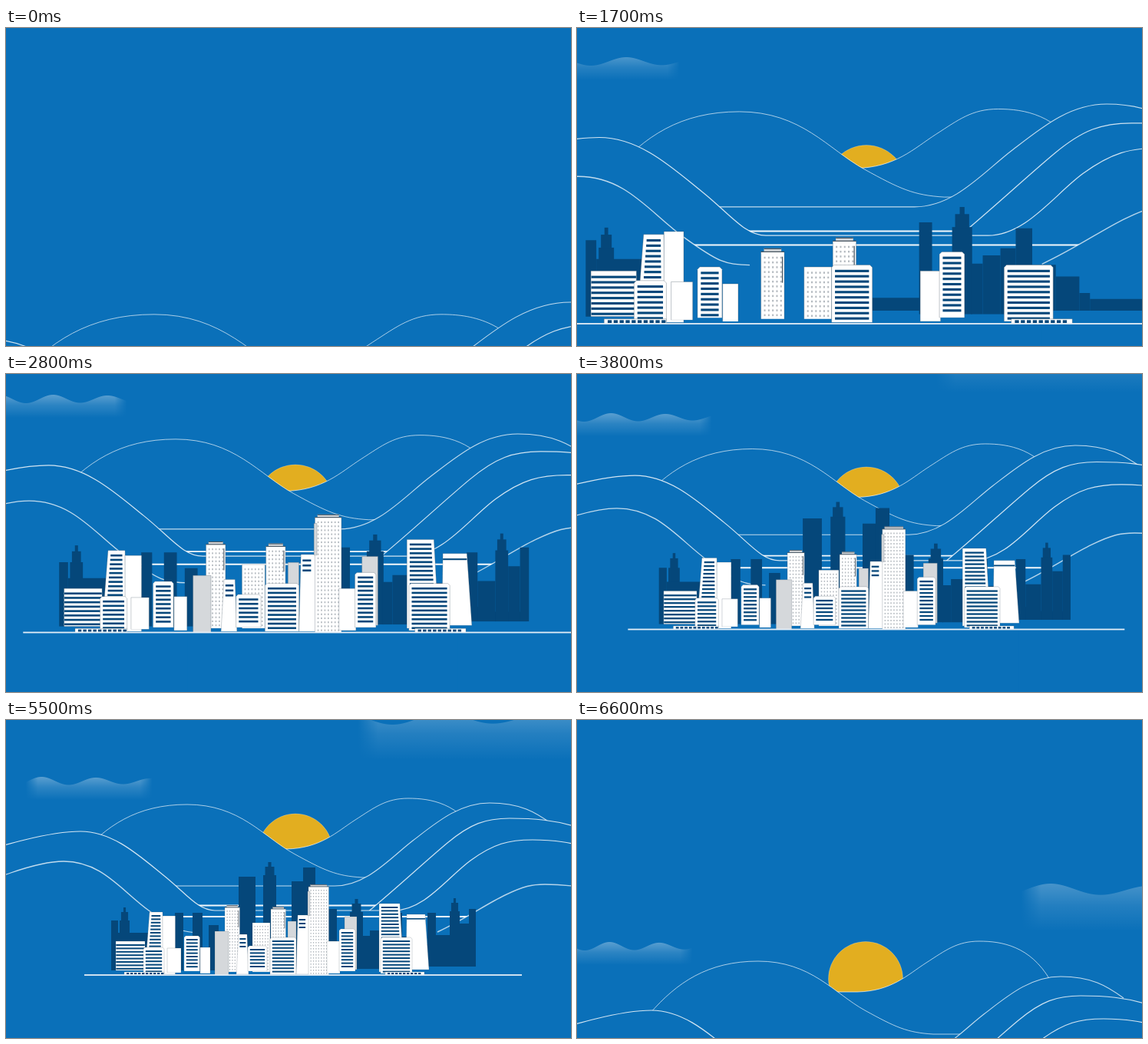
Write an HTML page with a canvas that moves like this. It is 736 by 414 pixels and loops after 6700 ms.

```html
<!DOCTYPE html>
<html lang="en">
<head>
<meta charset="utf-8">
<title>Skyline</title>
<style>
  html, body { margin: 0; width: 100%; height: 100%; overflow: hidden; background: #0a70b9; }
  canvas { display: block; }
</style>
</head>
<body>
<canvas id="stage" width="736" height="414"></canvas>
<script>
const W = 736, H = 414, LOOP = 6700, STEP = 100;
const SKY = '#0a70b9', NAVY = '#05477a', GREY = '#d5d8db', INK = '#46535f', SUN = '#e2ae20';
const c = document.getElementById('stage').getContext('2d');

// Smooth monotone interpolation through values at the shared key times (seconds).
const KEYS = [0, .8, 1.7, 2.15, 2.8, 3.8, 5.5];
function track(v, t) {
  const n = KEYS.length - 1;
  if (t >= KEYS[n]) return v[n];
  let i = 0;
  while (t >= KEYS[i + 1]) i++;
  const sec = j => (v[j + 1] - v[j]) / (KEYS[j + 1] - KEYS[j]);
  const slope = j => {
    if (j === 0) return sec(0);
    if (j === n) return sec(n - 1);
    const a = sec(j - 1), b = sec(j);
    return a * b <= 0 ? 0 : 2 * a * b / (a + b);
  };
  const h = KEYS[i + 1] - KEYS[i], u = (t - KEYS[i]) / h, w = 1 - u;
  return v[i] * (1 + 2 * u) * w * w + slope(i) * h * u * w * w
       + v[i + 1] * u * u * (3 - 2 * u) - slope(i + 1) * h * u * u * w;
}

const MOVE = {
  zoom: [1.42, 1.328, 1.24, 1.195, 1.147, 1.076, 1],
  hill: [357, 217, 99, 71, 78, 93, 108],
  sun: [424, 280, 152.5, 118, 118, 121, 122],
  city: [2.05, 1.82, 1.56, 1.43, 1.302, 1.135, 1],
  ground: [700, 542, 385, 350, 336.5, 332.5, 332],
  cloudY: [300, 171, 38, 13, 27, 51, 74],
  cloudPeak: [68, 66, 64, 63, 61, 44, 46],
  cloudPeriod: [93, 93, 93, 82, 71, 71, 71],
  cloudLeft: [-30, -30, -30, -30, -25, -18, 25],
  cloudRight: [90, 105, 133, 145, 157, 175, 190],
  cloudAlpha: [0, .1, .8, .9, 1, 1, 1],
  farY: [-90, -90, -90, -90, -75, -38, -10],
  farLeft: [480, 480, 480, 480, 475, 467, 458],
  farPeak: [600, 600, 600, 600, 595, 583, 569]
};

function ridge(d, anchor, lift, drop, line, alpha, far) {
  const start = d.match(/-?\d+/)[0];
  return { edge: new Path2D(d), body: new Path2D(`${d}V900H${start}Z`), anchor, lift, drop, line, alpha, far };
}
// Back to front: path, top, extra offset per zoom, final fall, line width, opacity
const RIDGES = [
  ridge('M330 168H365C410 167 430 146 455 130S495 102 524 102S590 108 616 152', 102, 52, 186, 1, .65, true),
  ridge('M95 178C130 138 170 110 236 110C305 110 335 152 375 174S430 203 464 205H500', 110, 33, 204, 1, .65, true),
  ridge('M150 216H428C470 216 500 180 530 157S590 108 630 108S690 120 712 136', 108, 0, 226, 1.1, .75),
  ridge('M235 241.5H500', 241.5, 0, 232, 1.9, .95),
  ridge('M470 251C510 218 545 185 575 160S625 128 656 128S715 130 745 140', 128, 0, 231, 1.2, .8),
  ridge('M-80 186C-20 168 50 145 97 145C140 145 175 178 205 202S250 248 272 248H505C545 248 575 205 605 183S655 156 686 156S735 160 760 166', 145, -10, 233, 1.2, .82),
  ridge('M170 256H622', 256, 0, 238, 1.9, .95),
  ridge('M-80 236C-20 206 40 184 75 184C125 184 150 222 186 248S230 277 255 277', 184, 0, 240, 1.3, .75),
  ridge('M562 276C600 258 625 240 650 228S685 214 702 214S745 216 775 222', 214, 0, 240, 1.4, .7)
];

function drawRidge(r, t, fall) {
  const z = track(MOVE.zoom, t) - 1, s = 1 + z * (r.far ? .71 : 1);
  const rest = r.far ? r.anchor - 108 : (r.anchor - 108) * s;
  c.save();
  c.translate(380, track(MOVE.hill, t) + rest + r.lift * z + r.drop * fall);
  c.scale(s, s);
  c.translate(-380, -r.anchor);
  c.fillStyle = SKY;
  c.fill(r.body);
  c.lineWidth = r.line / s;
  c.strokeStyle = `rgba(255,255,255,${r.alpha})`;
  c.stroke(r.edge);
  c.restore();
}

// x, width, top, base, kind, start of rise, inset of top left, inset of top right
const BACK = [
  [303, 22, 204, 324, 'dark', 3], [335, 17, 185, 324, 'spire', 3.05],
  [372, 17, 210, 324, 'dark', 3.1], [387, 16, 192, 324, 'dark', 3],
  [137, 9, 261, 326, 'dark', 1.1], [148, 13, 244, 326, 'spire', 1.3], [146, 44, 277, 326, 'dark', 1.1],
  [220, 11, 251, 326, 'dark', 1.8], [243, 13, 251, 326, 'dark', 1.8], [264, 13, 267, 326, 'dark', 1.75],
  [380, 60, 310, 321, 'dark', 1], [420, 11, 246, 324, 'dark', 1], [448, 17, 233, 324, 'spire', 1],
  [431, 17, 290, 324, 'dark', 1], [464, 10, 281, 324, 'dark', 1], [474, 15, 274, 324, 'dark', 1],
  [489, 13, 268, 324, 'dark', 1], [502, 14, 251, 324, 'dark', 1], [516, 20, 282, 321, 'dark', 1],
  [536, 20, 292, 321, 'dark', 1], [556, 9, 306, 321, 'dark', 1], [565, 45, 311, 321, 'dark', 1],
  [549, 11, 251, 321, 'dark', 1.8], [560, 18, 280, 321, 'dark', 1.8], [578, 13, 232, 321, 'spire', 1.8],
  [591, 12, 265, 321, 'dark', 1.8], [603, 9, 246, 321, 'dark', 1.85]
];
const FRONT = [
  [143, 38, 288, 326, 'lines', 1],
  [181, 24, 250, 328, 'stripe', 1.32, 6, 1], [204, 16.5, 255, 331, 'white', 0],
  [179, 27, 296, 330, 'stripe', 1], [154, 52, 328, 332, 'base', 1],
  [210, 18, 297, 329, 'white', 1], [232, 20.5, 281, 327, 'stripe', 1.3], [253, 13, 296, 330, 'white', 1.3],
  [285, 19.5, 241, 328, 'tower', 1.48], [321, 23, 264, 328, 'dots', 1.48], [345, 19.5, 243, 328, 'tower', 1.41],
  [367, 11, 262, 328, 'grey', 1.75], [272, 18, 275, 332, 'grey', 1.75],
  [300, 16, 279, 331, 'marks', 1.8, 3, 2], [315, 25, 294, 327, 'stripe', 1.75],
  [344, 34, 283, 331, 'stripe', 1], [378, 17, 254, 331, 'marks', 1.8, 2],
  [441, 16, 256, 325, 'grey', 1.75], [394, 26.5, 214, 332, 'tower', 1.75], [393, 3, 223, 255, 'grey', 1.9],
  [418, 17, 288, 330, 'white', 1], [434, 21, 272, 327, 'stripe', 1],
  [486, 32, 239, 328, 'stripe', 1.8, 0, 5], [521, 30, 253, 325, 'slab', 1.8, 1, 5],
  [488, 41, 283, 330, 'stripe', 1], [494, 51, 328, 332, 'base', 1]
];

function box(x, y, w, h, color) {
  c.fillStyle = color;
  c.fillRect(x, y, w, h);
}

function drawBuilding([x, w, top, base, kind, start, insetL = 0, insetR = 0], t) {
  const u = Math.min(1, (t - start) / .7);
  if (u <= 0) return;
  const h = base - top, r = x + w;
  const dark = kind === 'dark' || kind === 'spire';
  c.save();
  c.beginPath();
  c.rect(x - 1, 0, w + 2, base);
  c.clip();
  c.translate(0, h * (start ? (1 - u) ** 3 : 0));
  if (kind === 'spire') {
    box(x, top + 17, w, h - 17, NAVY);
    box(x + w * .15, top + 6, w * .7, 12, NAVY);
    box(x + w * .38, top, w * .24, 7, NAVY);
    c.restore();
    return;
  }
  const roof = kind === 'tower' ? top + 3 : top;
  const bevel = kind === 'stripe' && !insetL && !insetR ? 2 : 0;
  c.beginPath();
  c.moveTo(x, base);
  c.lineTo(x + insetL, roof + bevel);
  c.lineTo(x + insetL + bevel, roof);
  c.lineTo(r - insetR - bevel, roof);
  c.lineTo(r - insetR, roof + bevel);
  c.lineTo(r, base);
  c.closePath();
  c.fillStyle = dark ? NAVY : kind === 'grey' ? GREY : '#fff';
  c.fill();
  if (!dark) {
    c.lineWidth = .4;
    c.strokeStyle = 'rgba(70,85,100,.55)';
    c.stroke();
  }
  if (kind === 'stripe' || kind === 'lines') {
    const pad = kind === 'lines' ? .3 : 2.8;
    for (let y = top + 4; y < base - 3; y += 4.4) {
      const k = 1 - (y - top) / h, left = x + pad + insetL * k;
      box(left, y, r - pad - insetR * k - left, 2, NAVY);
    }
  }
  if (kind === 'tower' || kind === 'dots') {
    for (let y = roof + 4; y < base - 2; y += 4)
      for (let px = x + 2.5; px < r - 2; px += 3.4) box(px, y, 1.3, 1.6, '#b3b9bf');
  }
  if (kind === 'tower') {
    box(x + 2.5, top, w - 5, 3, GREY);
    box(x + 2.5, top, w - 5, .8, INK);
    box(x, roof - .5, w, .8, INK);
    if (w < 24) box(r - 2, roof + 4, .8, h * .25, INK);
  }
  if (kind === 'marks') for (let i = 0; i < 3; i++) box(x + 2 + insetL * .8, top + 5 + i * 5, w * .5, 2, NAVY);
  if (kind === 'slab') box(x + 1, top + 5, w - 6, 1.6, NAVY);
  if (kind === 'base') for (let px = x + 3; px < r - 3; px += 5) box(px, top + 1, 3.4, 2.4, NAVY);
  c.restore();
}

function drawCity(t, fall) {
  const layer = (pivot, s, paint) => {
    c.save();
    c.translate(pivot, track(MOVE.ground, t) + 290 * fall);
    c.scale(s, s);
    c.translate(-pivot, -332);
    paint();
    c.restore();
  };
  const s = track(MOVE.city, t);
  layer(372, 1 + (s - 1) * .955, () => BACK.forEach(b => drawBuilding(b, t)));
  layer(366, s, () => {
    FRONT.forEach(b => drawBuilding(b, t));
    box(102, 332 - .9 / s, 570, 1.8 / s, '#e4eef7');
  });
}

// A wavy top edge with a fade downwards and at both ends
function drawCloud(peak, period, amp, top, left, right, depth, alpha, soft) {
  const g = c.createLinearGradient(0, top, 0, top + depth);
  g.addColorStop(0, 'rgba(255,255,255,.33)');
  g.addColorStop(.45, 'rgba(255,255,255,.14)');
  g.addColorStop(1, 'rgba(255,255,255,0)');
  c.fillStyle = g;
  for (let x = Math.max(0, Math.round(left)); x < Math.min(W, right); x++) {
    const d = x - peak, a = amp * (1 - Math.min(.5, Math.max(0, d) * .0025));
    const y = top + amp - a * Math.cos(2 * Math.PI * d / period);
    c.globalAlpha = alpha * Math.min(1, (x - left) / soft, (right - x) / soft);
    c.fillRect(x, y, 1, top + depth - y);
  }
  c.globalAlpha = 1;
}

function drawSun(t, fall) {
  const r = 48.5 + 12 * (track(MOVE.zoom, t) - 1);
  c.beginPath();
  c.arc(377 - fall, track(MOVE.sun, t) + r + 166.5 * fall, r, 0, 7);
  c.fillStyle = SUN;
  c.fill();
  c.lineWidth = .8;
  c.strokeStyle = 'rgba(255,255,255,.3)';
  c.stroke();
}

function draw(t) {
  const fall = Math.max(0, t - 5.6) ** 3.3;
  const at = name => track(MOVE[name], t);
  box(0, 0, W, H, SKY);
  drawCloud(at('cloudPeak') - 4 * fall, at('cloudPeriod') - 6 * fall, 5.5, at('cloudY') + 215 * fall,
    at('cloudLeft') - 45 * fall, at('cloudRight') - 40 * fall, 30, at('cloudAlpha'), 16);
  drawCloud(at('farPeak') + 48 * fall, 132, 8, at('farY') + 223 * fall,
    at('farLeft') + 120 * fall, W + 60, 62, .75, 26);
  drawSun(t, fall);
  RIDGES.forEach(r => drawRidge(r, t, fall));
  drawCity(t, fall);
}

const begin = performance.now();
function tick() {
  const ms = Math.max(0, performance.now() - begin) % LOOP;
  draw(Math.floor(ms / STEP) * STEP / 1000);
  requestAnimationFrame(tick);
}
tick();
</script>
</body>
</html>
```
